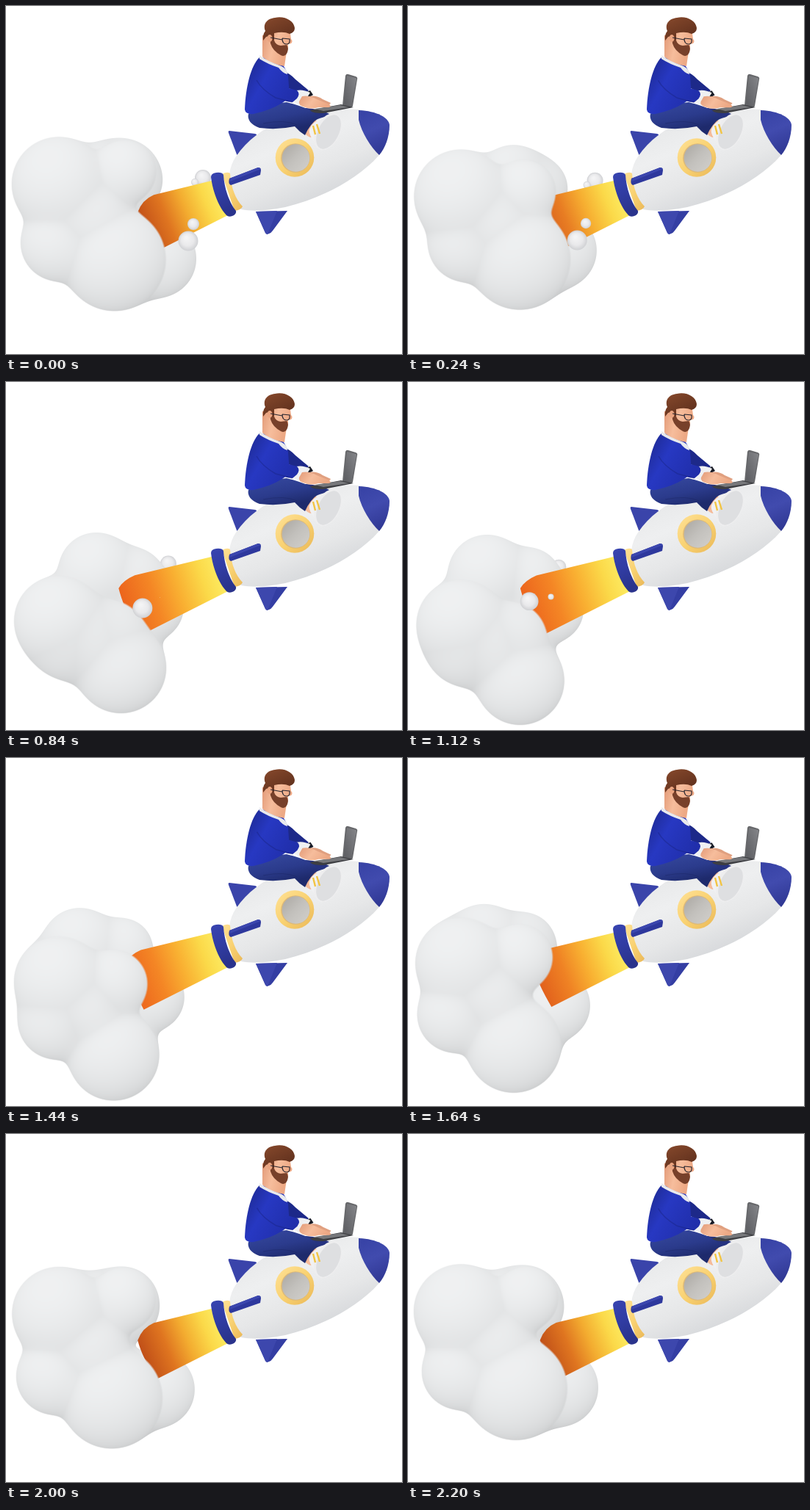
These frames come from a looping animation (539 px wide and 474 px high, 2.24 s). An HTML page with a canvas:

```html
<!DOCTYPE html>
<html lang="en">
<head>
<meta charset="utf-8">
<title>Rocket ride</title>
<style>
  html, body { margin: 0; width: 100%; height: 100%; overflow: hidden; background: #fff; }
  canvas, svg { position: absolute; left: 0; top: 0; width: 539px; height: 474px; }
</style>
</head>
<body>
<canvas id="smoke" width="539" height="474"></canvas>
<svg viewBox="0 0 539 474">
  <defs>
    <linearGradient id="hull" gradientUnits="userSpaceOnUse" x1="385" y1="150" x2="432" y2="266">
      <stop offset="0" stop-color="#e8e9ea"/><stop offset=".3" stop-color="#eeeff0"/>
      <stop offset=".65" stop-color="#e6e7e8"/><stop offset="1" stop-color="#d5d7da"/>
    </linearGradient>
    <linearGradient id="nose" gradientUnits="userSpaceOnUse" x1="490" y1="143" x2="514" y2="198">
      <stop offset="0" stop-color="#3843a6"/><stop offset=".45" stop-color="#414bae"/><stop offset="1" stop-color="#303894"/>
    </linearGradient>
    <linearGradient id="collar" x1="0" y1="0" x2=".3" y2="1">
      <stop offset="0" stop-color="#3844b0"/><stop offset=".5" stop-color="#313da4"/><stop offset="1" stop-color="#2a338c"/>
    </linearGradient>
    <linearGradient id="gold" x1="0" y1="0" x2="1" y2="1">
      <stop offset="0" stop-color="#ffe197"/><stop offset=".5" stop-color="#f9d272"/><stop offset="1" stop-color="#eab858"/>
    </linearGradient>
    <linearGradient id="glass" x1="0" y1="0" x2="1" y2="1">
      <stop offset="0" stop-color="#aaa7a2"/><stop offset=".5" stop-color="#c3c1bd"/><stop offset="1" stop-color="#d2d0cc"/>
    </linearGradient>
    <linearGradient id="knit" gradientUnits="userSpaceOnUse" x1="328" y1="90" x2="392" y2="126">
      <stop offset="0" stop-color="#1f2c9a"/><stop offset=".35" stop-color="#2738c2"/><stop offset="1" stop-color="#202eaa"/>
    </linearGradient>
    <linearGradient id="denim" gradientUnits="userSpaceOnUse" x1="370" y1="132" x2="378" y2="170">
      <stop offset="0" stop-color="#33459a"/><stop offset=".5" stop-color="#2b3b8c"/><stop offset="1" stop-color="#1e2a6c"/>
    </linearGradient>
    <linearGradient id="skin" x1="0" y1="0" x2="1" y2=".3">
      <stop offset="0" stop-color="#e29a78"/><stop offset=".5" stop-color="#f6bd9c"/><stop offset="1" stop-color="#eda985"/>
    </linearGradient>
    <linearGradient id="hair" x1="0" y1="0" x2=".6" y2="1">
      <stop offset="0" stop-color="#87492c"/><stop offset="1" stop-color="#5f301d"/>
    </linearGradient>
    <linearGradient id="lid" x1="1" y1="0" x2="0" y2="1">
      <stop offset="0" stop-color="#85868a"/><stop offset="1" stop-color="#5b5c60"/>
    </linearGradient>
  </defs>

  <g id="rocket">
    <path fill="#3a44aa" d="M304 170Q302 170 303 173L314 202Q315 204 317 202L341 177Q342 175 339 174Z"/>
    <path fill="#343ea3" d="M340 280L353 309Q355 312 358 310Q361 309 363 306L383 279Z"/>
    <path fill="#3d47ad" d="M340 280L353 309Q354 311 356 311L369 279Z"/>
    <path fill="url(#hull)" d="M313 205C328 183 350 166 376 157C418 143 455 138 481 141C506 145 521 153 522 163C521 180 515 195 507 204C480 235 430 262 380 274C355 279 336 280 320 277C310 265 304 248 304 229Q306 215 313 205Z"/>
    <path fill="url(#nose)" d="M480 142C505 143 521 152 522 162C522 178 516 194 508 203C496 192 484 172 480 155Z"/>
    <path fill="url(#gold)" d="M294 229Q301 225 305 228C306 246 312 263 322 273Q320 278 311 279Z"/>
    <path fill="url(#collar)" d="M279 233Q279 228 286 227Q294 226 296 230C297 248 304 268 313 279Q314 284 308 286Q303 288 300 285C288 272 281 250 279 233Z"/>
    <path fill="#2e389d" d="M304 235L343 220Q347 220 347 224L346 230L306 244Q302 242 304 235Z"/>
    <path fill="#3b46ae" d="M304 235L343 220Q346 220 347 222L305 239Z"/>
    <circle cx="393" cy="206.5" r="26.3" fill="url(#gold)"/>
    <circle cx="394" cy="207" r="19.8" fill="#dcb878"/>
    <circle cx="394.5" cy="207" r="18.8" fill="url(#glass)"/>
  </g>

  <g id="rider">
    <path fill="#1d2989" d="M376 88Q387 92 394 100L412 115L404 122L385 112Z"/>
    <path fill="#263380" d="M376 140Q412 136 434 144L444 149Q420 152 408 165Z"/>
    <path fill="url(#skin)" d="M421 155L405 170Q410 181 421 179L427 160Z"/>
    <path fill="url(#denim)" d="M330 147C345 140 366 132 382 131C406 137 422 144 425 153Q414 160 407 176Q399 171 393 164Q370 169 345 166C333 162 328 154 330 147Z"/>
    <path fill="none" stroke="#1a2460" opacity=".4" d="M350 160Q380 154 396 162"/>
    <path fill="#f1f1f2" d="M413 168Q418 157 428 154L440 150L428 194Q411 178 413 168Z"/>
    <ellipse cx="438" cy="171" rx="16.5" ry="27" transform="rotate(27 438 171)" fill="#eeeeef"/>
    <ellipse cx="439" cy="171.500" rx="14" ry="25" transform="rotate(27 439 171.500)" fill="#dedfe1"/>
    <path fill="none" stroke="#f2c443" stroke-width="2.4" d="M418 163L421 175M423 161L427 174"/>

    <path fill="#67686b" d="M462 95Q463 92 466 93L476 96Q479 97 478 100L472 136Q471 139 468 138L458 135Z"/>
    <path fill="url(#lid)" d="M464 95L476 98Q477 98 477 100L470 137L460 134Z"/>
    <path fill="#3d3e42" d="M414 142L456 134L473 138L432 146Q416 146 414 142Z"/>
    <path fill="#77787b" d="M420 140L455 135L467 138L432 143Z"/>

    <path fill="url(#knit)" d="M345 70C333 81 326 112 325 141Q326 148 337 147Q360 142 376 132L386 125L384 95Q378 76 365 72Z"/>
    <path fill="url(#skin)" d="M349 40L349 69Q359 79 379 82L382 62L377 40Z"/>
    <path fill="#e9eaed" d="M345 67Q355 75 375 82Q383 86 383 93Q376 91 371 84Q356 79 345 72Z"/>
    <path fill="url(#skin)" d="M357 25Q373 24 386 30L388 45Q391 48 388 51L384 52Q385 62 379 66L364 52Z"/>
    <path fill="#77402a" d="M359 39Q364 38 365 47Q367 53 374 54L382 53Q385 57 383 63Q380 70 374 67Q363 61 360 51Z"/>
    <path fill="url(#hair)" d="M350 47Q349 39 353 34C349 24 356 17 366 16C379 13 392 20 393 30Q393 36 386 38Q378 34 365 37L365 46L360 48Q358 40 354 42Z"/>
    <ellipse cx="359" cy="44" rx="3.500" ry="5" fill="#eaa480"/>
    <path fill="none" stroke="#2a2730" stroke-width="1.200" d="M360 43L376 46M376 44L386 45Q387 52 382 52Q376 52 376 44"/>

    <g id="arm">
      <path fill="#171b26" d="M407 118L414 115L418 121L411 125Z"/>
      <path fill="#e0a080" d="M412 123Q423 121 431 127L442 132Q440 136 433 134L415 132Z"/>
      <path fill="#eff0f2" d="M387 128L395 115Q404 113 414 118L409 126L399 135Z"/>
      <path fill="url(#skin)" d="M403 123Q412 121 423 127L440 134Q444 137 439 138L425 138Q415 141 407 138Q397 135 399 130Z"/>
      <path fill="url(#knit)" d="M340 84Q350 77 360 90L378 110L396 115Q401 119 396 126L390 131Q377 130 366 124Q347 113 341 101Q336 91 340 84Z"/>
      <path fill="none" stroke="#18227c" stroke-width="1.500" opacity=".4" d="M341 101Q348 114 367 125L390 131"/>
    </g>
  </g>
</svg>

<script>
const LOOP = 2240, STEP = 40;
const TOP = 165, W = 290, H = 309;
const SOFT = 900;

const ctx = document.getElementById('smoke').getContext('2d');
const arm = document.getElementById('arm');
const sheet = document.createElement('canvas');
sheet.width = W;
sheet.height = H;
const sheetCtx = sheet.getContext('2d');
const clamp = v => Math.max(0, Math.min(1, v));
const mix = (a, b, k) => a + (b - a) * k;
const sin = deg => Math.sin(deg * Math.PI / 180);
const cos = deg => Math.cos(deg * Math.PI / 180);

// A sphere on an elliptic orbit; angles in degrees, one turn per loop.
const blob = (x, y, r, { sway = 0, rise, lag = 0, xLag = lag, swell = 0 }) => turn => [
  x + sway * sin(turn + xLag),
  y - rise * cos(turn + lag),
  r + swell * cos(turn)
];
const front = [
  blob(72, 286, 62, { rise: 45, lag: 15, swell: 2 }),
  blob(151, 287, 45, { sway: 10, rise: 65, lag: 20, xLag: 100, swell: -2 }),
  blob(150, 376, 65, { sway: 7, rise: 33, lag: -21, swell: 5 }),
  blob(75, 342, 52, { sway: 11, rise: 20, lag: -15 })
];
const back = [
  blob(121, 245, 47, { sway: 21, rise: 16, xLag: 40, swell: -6 }),
  blob(169, 255, 39, { sway: 11, rise: 14, lag: 20, swell: -3 }),
  blob(200, 327, 49, { sway: 6, rise: -21, lag: 35, xLag: 90, swell: 4 })
];

// Smooth union of spheres, lit from above; edge is the width of its rim in px.
function drawBlobs(blobs, edge) {
  const img = sheetCtx.createImageData(W, H), px = img.data;
  for (let y = 0, o = 0; y < H; y++) {
    for (let x = 0; x < W; x++, o += 4) {
      let sum = 0, cx = 0, cy = 0, top = 0;
      for (const [bx, by, r] of blobs) {
        const dx = x + .5 - bx, dy = y + TOP + .5 - by;
        const q = (r * r - dx * dx - dy * dy) / SOFT;
        if (q < -6) continue;
        const e = Math.exp(q);
        sum += e;
        cx += e * dx;
        cy += e * dy;
        if (e > top) top = e;
      }
      if (sum < .8) continue;
      const Q = SOFT * Math.log(sum);
      cx /= sum;
      cy /= sum;
      const alpha = clamp(Q / (2 * Math.hypot(cx, cy) + 1) / edge + .5);
      const z = Math.sqrt(Math.max(Q, 0));
      const len = Math.hypot(cx, cy, z) + .01;
      const lit = .5 + .5 * (-.25 * cx - .56 * cy + .79 * z) / len;
      const v = 174 + 66 * Math.sqrt(lit) - 12 * (1 - top / sum);
      px[o] = v - 1;
      px[o + 1] = v + .5;
      px[o + 2] = v + 1.5;
      px[o + 3] = 255 * alpha;
    }
  }
  sheetCtx.putImageData(img, 0, 0);
  ctx.drawImage(sheet, 0, TOP);
}

function drawPearl(x, y, r) {
  if (r < .2) return;
  const g = ctx.createRadialGradient(x - r * .2, y - r * .35, r * .1, x, y, r);
  g.addColorStop(0, '#f4f4f5');
  g.addColorStop(.6, '#e9e9eb');
  g.addColorStop(1, '#d0d1d4');
  ctx.fillStyle = g;
  ctx.beginPath();
  ctx.arc(x, y, r, 0, 7);
  ctx.fill();
}

function drawFlame(turn) {
  const pull = cos(turn + 20);
  const x = 166 + 14 * pull, dark = .1 + .9 * Math.max(0, pull);
  const upper = v => 238 + (281 - v) * .24;
  const lower = v => 285 + (302 - v) * .505;
  const shade = (a, b) => 'rgb(' + a.map((v, i) => Math.round(mix(v, b[i], dark))) + ')';
  const g = ctx.createLinearGradient(x + 8, 304, 294, 260);
  g.addColorStop(0, shade([241, 104, 30], [190, 78, 24]));
  g.addColorStop(.3, shade([246, 136, 38], [222, 116, 32]));
  g.addColorStop(.55, shade([250, 176, 50], [243, 172, 48]));
  g.addColorStop(.8, '#fbd949');
  g.addColorStop(1, '#fdec63');
  ctx.fillStyle = g;
  ctx.beginPath();
  ctx.moveTo(284, 237);
  ctx.lineTo(x + 22, upper(x + 22));
  ctx.quadraticCurveTo(x + 6, upper(x + 6) + 3, x, 281);
  ctx.quadraticCurveTo(x + 6, 305, x + 26, lower(x + 26));
  ctx.lineTo(304, 284);
  ctx.fill();
}

function draw(t) {
  const turn = t / LOOP * 360, s = t / 1000;
  const near = front.map(place => place(turn));
  const mean = c => near.reduce((sum, b) => sum + b[c], 0) / near.length;
  near.push([mean(0), mean(1), 54]);
  const far = back.map(place => place(turn));
  const fade = clamp((1.35 - s) / .25);

  ctx.fillStyle = '#fff';
  ctx.fillRect(0, 0, 539, 474);
  drawPearl(268 - 56 * s, 234 + 16 * s, 11 * fade);
  drawPearl(257 - 56 * s, 240 + 16 * s, 5 * fade);
  drawBlobs([...near, ...far], 1);
  drawFlame(turn);
  drawBlobs(near, 2.5);
  drawPearl(255 - 54 * s, 297 - 4 * s, 8 * Math.abs(cos(s * 110)) * fade);
  drawPearl(248 - 74 * s, 320 - 17 * s * s, 13.5 * fade);
  const bob = .6 * sin(turn * 8);
  arm.setAttribute('transform', `translate(${bob.toFixed(2)} ${(-bob * .6).toFixed(2)})`);
}

let shown = -1;
const start = performance.now();
function tick() {
  const step = Math.floor((performance.now() - start) % LOOP / STEP);
  if (step !== shown) {
    shown = step;
    draw(step * STEP);
  }
  requestAnimationFrame(tick);
}
tick();
</script>
</body>
</html>
```
